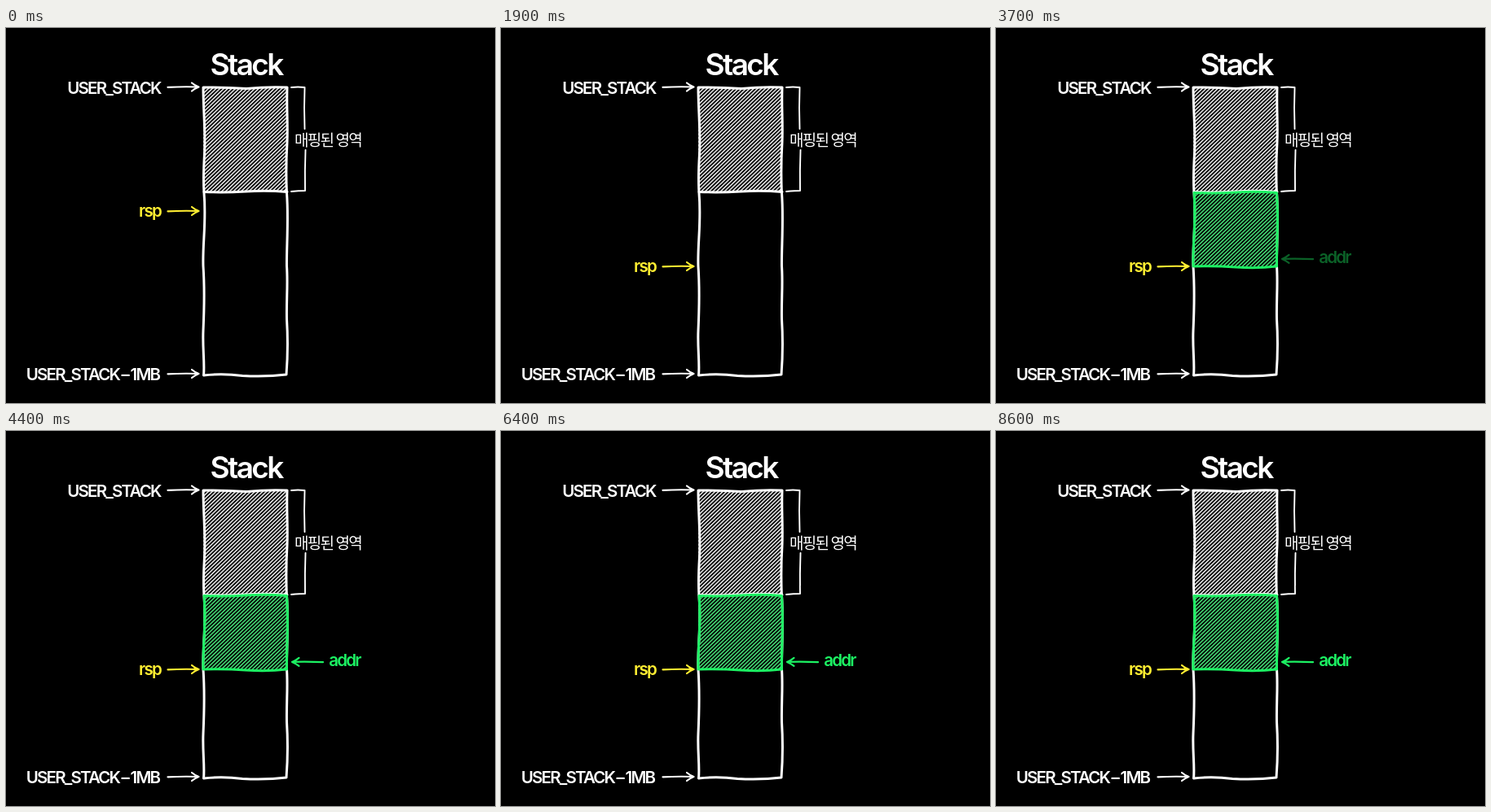
Recreate the animation shown at these times as an HTML page. Size 600 by 461 pixels, loop 8700 ms.

```html
<!DOCTYPE html>
<html lang="ko">
<head>
<meta charset="utf-8">
<title>Stack growth</title>
<style>
  html, body { margin: 0; width: 100%; height: 100%; overflow: hidden; background: #000; }
  svg { display: block; width: 100%; height: 100%; }
  text { font: 600 20.5px Inter, Roboto, sans-serif; letter-spacing: -1.8px; text-anchor: middle; fill: currentColor; }
  .title { font-size: 37px; letter-spacing: -2.6px; }
  .ko { font: 500 19px "Noto Sans CJK KR", "Noto Sans CJK", sans-serif; }
  .line { fill: none; stroke: currentColor; stroke-linecap: round; stroke-linejoin: round; }
  .box { stroke-width: 3; }
  .thin { stroke-width: 1.9; }
  .arrow { stroke-width: 2.2; }
  .white { color: #fff; }
  .yellow { color: #ffee32; }
  .green { color: #1cf263; }
</style>
</head>
<body>
<svg viewBox="0 0 600 461">
  <defs>
    <pattern id="hatchWhite" width="3.3" height="3.3" patternUnits="userSpaceOnUse" patternTransform="rotate(-44)">
      <path d="M0 1.65H3.3" stroke="#fff" stroke-width="1.4"/>
    </pattern>
    <pattern id="hatchGreen" width="3.3" height="3.3" patternUnits="userSpaceOnUse" patternTransform="rotate(-44)">
      <path d="M0 1.65H3.3" stroke="#4df583" stroke-width="1.4"/>
    </pattern>
    <linearGradient id="edge" gradientUnits="userSpaceOnUse" x1="0" x2="0" y1="0" y2="14">
      <stop stop-color="#fff"/>
      <stop offset="1" stop-color="#000"/>
    </linearGradient>
    <mask id="wipe" maskUnits="userSpaceOnUse" x="230" y="190" width="130" height="115">
      <rect x="230" y="190" width="130" height="115" fill="url(#edge)"/>
    </mask>
    <path id="arrow" class="line arrow" d="M-38 .3Q-19 -.6 0 0M-8.5 -5Q-5 -2 0 0Q-5 2 -8.5 5"/>
  </defs>

  <rect width="600" height="461"/>

  <g class="white">
    <text class="title" x="294.7" y="58">Stack</text>
    <text x="132.5" y="81">USER_STACK</text>
    <text x="106.5" y="433">USER_STACK<tspan dx="2.5">–</tspan><tspan dx="2.5">1MB</tspan></text>
    <use href="#arrow" x="236.5" y="72.5"/>
    <use href="#arrow" x="236.5" y="425"/>

    <path fill="url(#hatchWhite)" d="M242 73H345V201H242Z"/>
    <path class="line box" d="M242 73C242 100 245 128 243.5 155C242 180 242 188 243 203C246 238 241 265 242 293C244 322 243 350 242 372C241 394 244 412 242.5 427Q266 424.5 290 427.5Q320 429 344 426C346 400 346 382 344.5 358C344 332 346 315 344.5 293C344 272 347 236 344.5 203C343 174 344 157 345 140C346 115 344 96 345 73Q320 72 295 74.5Q268 72.5 242 73Z"/>
    <path class="line box" d="M243 201.5Q268 202.5 294 201T345 201.5"/>

    <path class="line thin" d="M350 73Q358 72 366.5 73Q365.5 98 366.5 124M367.5 150Q366.5 176 367 200Q359 200 350 201"/>
    <text class="ko" x="395" y="144.5">매핑된 영역</text>
  </g>

  <g class="green" mask="url(#wipe)">
    <path fill="url(#hatchGreen)" d="M242 202H345V293H242Z"/>
    <path class="line box" d="M243 202.5C246 238 241 265 242 293Q268 292 294 294T344.5 293C344 272 347 236 344.5 202.5Q320 200.5 294 202T243 202.5Z"/>
  </g>

  <g id="rsp" class="yellow">
    <text x="176.5" y="6.5">rsp</text>
    <use href="#arrow" x="236.5"/>
  </g>

  <g id="addr" class="green">
    <text x="415.5" y="5.8">addr</text>
    <use href="#arrow" transform="translate(351 .4) scale(-1 1)"/>
  </g>
</svg>
<script>
  const LOOP = 8700;
  const $ = id => document.getElementById(id);
  const rsp = $("rsp"), addr = $("addr"), edge = $("edge");

  const span = (t, from, to) => Math.min(1, Math.max(0, (t - from) / (to - from)));
  const ease = p => 0.5 - 0.5 * Math.cos(Math.PI * p);
  const moveY = (el, y) => el.setAttribute("transform", `translate(0 ${y.toFixed(2)})`);

  function draw(t) {
    moveY(rsp, 225 + 68 * ease(span(t, 300, 1300)));

    const front = 197 + 117 * span(t, 1950, 2950);
    edge.setAttribute("y1", front - 14);
    edge.setAttribute("y2", front);

    addr.setAttribute("opacity", span(t, 3300, 4300));
    // up, down, up, down
    moveY(addr, 283.5 - 71.5 * ease(4 * span(t, 4400, 8400)));
  }

  const start = performance.now();
  function tick() {
    draw((performance.now() - start) % LOOP);
    requestAnimationFrame(tick);
  }
  tick();
</script>
</body>
</html>
```
